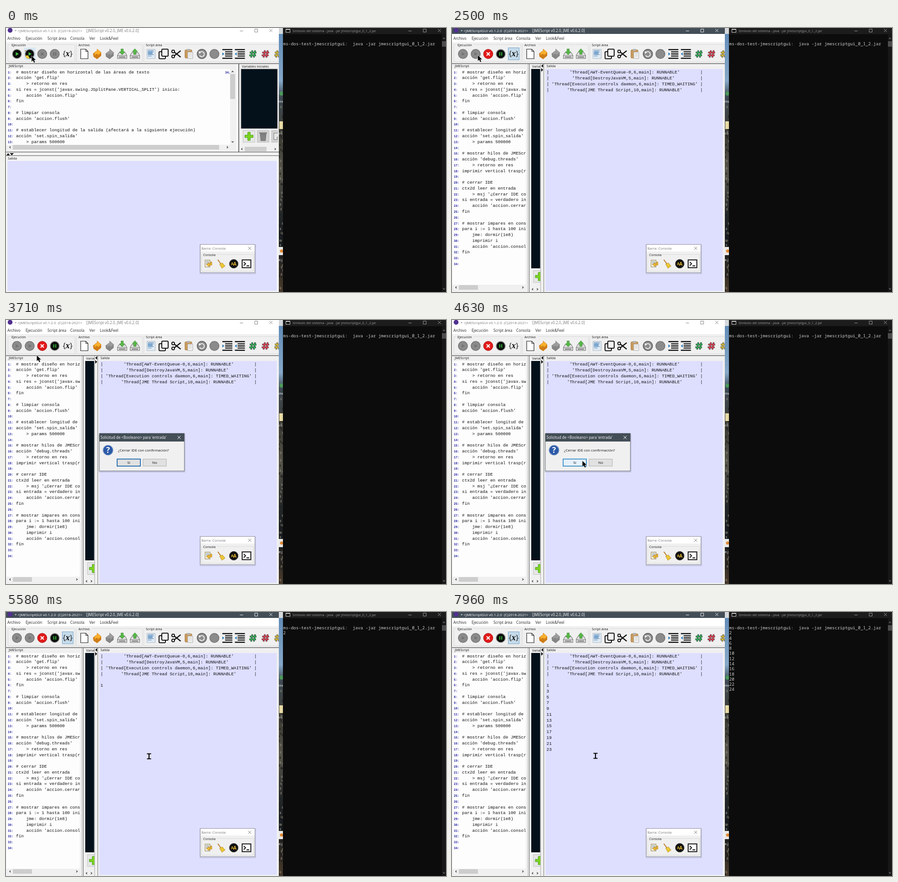
An HTML page that plays this animation: 966 px wide and 580 px high, repeating every 8000 ms.

```html
<!DOCTYPE html>
<html lang="es">
<head>
<meta charset="utf-8">
<title>JMEScriptGUI</title>
<style>
html, body { margin: 0; width: 100%; height: 100%; overflow: hidden; background: #f0f0f0; }
svg { display: block; }
text { white-space: pre; font-family: "Open Sans", "Noto Sans", sans-serif; }
.code { font-family: "Liberation Mono", "Courier New", monospace; }
.term { font-family: "Noto Sans Mono", "DejaVu Sans Mono", monospace; }
</style>
</head>
<body>
<svg id="stage" width="100%" height="100%" viewBox="0 0 966 580"></svg>
<script>
const LOOP = 8000, LINE = 12.77;
const PRESS = 1420, RUN = 1500, FLIP = 1540, OUTPUT = 1700;
const ASK = 2600, ANSWER = 5300, COUNT = 5450, STEP = 108;

const rect = (x, y, w, h, fill, more = '') => `<rect x="${x}" y="${y}" width="${w}" height="${h}" fill="${fill}" ${more}/>`;
const circle = (x, y, r, fill, more = '') => `<circle cx="${x}" cy="${y}" r="${r}" fill="${fill}" ${more}/>`;
const path = (d, fill, stroke = 'none', w = 1, more = '') => `<path d="${d}" fill="${fill}" stroke="${stroke}" stroke-width="${w}" ${more}/>`;
const line = (d, stroke, w = 1) => path(d, 'none', stroke, w);
const esc = s => s.replace(/&/g, '&amp;').replace(/</g, '&lt;');
const text = (x, y, s, size = 8.3, fill = '#222', more = '') => `<text x="${x}" y="${y}" font-size="${size}" fill="${fill}" ${more}>${esc(s)}</text>`;
const label = (x, y, s) => text(x, y, s, 7.2, '#111');
const code = (x, y, s, more = '') => text(x, y, s, 9.4, '#111', 'class="code" ' + more);
const term = (y, s, more = '') => text(608.5, y, s, 9.43, '#ccc', 'class="term" ' + more);
const at = (x, y, body) => `<g transform="translate(${x} ${y})">${body}</g>`;
const group = (id, body) => `<g id="${id}">${body}</g>`;
const clip = (x, y, w, h, body) => `<svg x="${x}" y="${y}" width="${w}" height="${h}" viewBox="${x} ${y} ${w} ${h}">${body}</svg>`;
const chevron = (x, y, turn, color = '#333') =>
  `<g transform="translate(${x} ${y}) rotate(${turn})">${line('M-2 1.2L0 -1.2L2 1.2', color, 1.2)}</g>`;
const cross = (x, y, r, color, w = 1) => line(`M${x - r} ${y - r}l${2 * r} ${2 * r}m0 ${-2 * r}l${-2 * r} ${2 * r}`, color, w);
const windowButtons = (x, color) =>
  line(`M${x - 3.5} 6.5h7M${x + 29} 2.5h6.5v6.5h-6.5z`, color, .9) + cross(x + 64.5, 5.5, 3.3, color, .9);

const script = [
  '# mostrar diseño en horizontal de las áreas de texto',
  "acción 'get.flip'",
  '    > retorno en res',
  "si res = jconst('javax.swing.JSplitPane.VERTICAL_SPLIT') inicio:",
  "    acción 'accion.flip'",
  'fin', '',
  '# limpiar consola',
  "acción 'accion.flush'", '',
  '# establecer longitud de la salida (afectará a la siguiente ejecución)',
  "acción 'set.spin_salida'",
  '    > params 500000', '',
  '# mostrar hilos de JMEScript',
  "acción 'debug.threads'",
  '    > retorno en res',
  'imprimir vertical trasp(res)', '',
  '# cerrar IDE',
  'ctx2d leer en entrada',
  "    > msj '¿Cerrar IDE con confirmación?'",
  'si entrada = verdadero inicio:',
  "    acción 'accion.cerrar'",
  'fin', '',
  '# mostrar impares en consola',
  'para i := 1 hasta 100 inicio:',
  '    jme: dormir(1e8)',
  '    imprimir i',
  "    acción 'accion.consola'",
  'fin', '', ''
];
const threads = ['AWT-EventQueue-0,6,main]: RUNNABLE', 'DestroyJavaVM,5,main]: RUNNABLE',
  'Execution controls daemon,6,main]: TIMED_WAITING', 'JME Thread Script,10,main]: RUNNABLE'];

const lineNumber = (x, y, s) => text(x, y, s, 6.7, '#2020a0', 'class="code" font-weight="bold"');
const listing = script.map((s, i) => {
  const y = 99.5 + i * LINE;
  return lineNumber(4, y, i + 1 + ':') + code(22, y, s);
}).join('');

function threadRow(s, i) {
  const full = `'Thread[${s}'`, pad = Math.floor((57 - full.length) / 2);
  return code(207.5, 100.2 + i * LINE, '| ' + (' '.repeat(pad) + full).padEnd(57) + ' |');
}

// Toolbar icons, centred on the origin
const disc = (on, mark) => circle(0, 0, 10, on ? '#0b0f0c' : '#8b8b8b', `stroke="${on ? '#9a9a9a' : '#777'}" stroke-width="1.5"`) + mark;
const triangle = fill => path('M-2.5 -4L4 0L-2.5 4Z', fill);
const pause = fill => rect(-3.2, -3.7, 2.1, 7.4, fill) + rect(1.1, -3.7, 2.1, 7.4, fill);
const broom = path('M-7 -9L1 2', 'none', '#b97a2a', 2) + path('M-3 1L3 -2L9 5L2 10Z', '#f4cf3c', '#a8801c', .8) + line('M0 2L4 8M2 0L7 6', '#c99b22', .7);
const sheet = path('M-8 -10.5H3L8 -5.5V10.5H-8Z', '#fff', '#222', 1.2) + line('M3 -10.5V-5.5H8', '#222');
const openArrow = (light, dark) => path('M-9 -1L-4 -4L9 -4V4L0 11.5L-8 6Z', dark) +
  path('M-6 5V-1Q-5 -6 0 -6V-11L9 -3L1 4V0Q-4 0 -6 5Z', light, dark, .8);
const drive = path('M-7 -3H7L10.3 3V10H-10.3V3Z', '#dedede', '#666') + line('M-10 3.5H10', '#777') + rect(-7, 6, 14, 1.6, '#555');
const downArrow = path('M-2.5 -11H2.5V-5H6L0 2L-6 -5H-2.5Z', '#58b947', '#2c7d24', .7);
const upArrow = path('M-2.5 1H2.5V-5H6L0 -11.5L-6 -5H-2.5Z', '#58b947', '#2c7d24', .7);
const selectIcon = rect(-9, -10, 18, 20, '#dfeaf4', 'stroke="#a6b8c8"') + rect(-7, -6, 10, 8, '#8fbbe2') +
  line('M-7 -7.5H6M-7 -4.5H6M-7 -1.5H4M-7 1.5H6M-7 4.5H1', '#5681aa');
const page = (x, y) => rect(x, y, 14, 15.5, '#f4f4f4', 'rx="2" stroke="#111" stroke-width="2"');
const copyIcon = page(-10, -5) + page(-4, -10.5);
const scissors = line('M-4 -4L10 7M-4 4L10 -7', '#151515', 2.4) +
  circle(-6.5, -5.5, 3, 'none', 'stroke="#151515" stroke-width="2"') + circle(-6.5, 5.5, 3, 'none', 'stroke="#151515" stroke-width="2"');
const paste = rect(-9, -9, 15, 18, '#c99a5b', 'rx="1.5" stroke="#a07438"') + rect(-5, -11, 7, 4, '#b5b5b5') +
  path('M-3 -4H8V10H-3Z', '#f2f2f2', '#aaa') + line('M-1 -1H6M-1 2H6M-1 5H6', '#bbb', .8);
const turn = circle(0, 0, 10.3, '#8d8d8d', 'stroke="#5c5c5c" stroke-width="1.4"') +
  line('M-4.5 -3A5.5 5.5 0 1 1 -5 3', '#f2f2f2', 1.8) + path('M-7 -6L-1.5 -4L-6 0Z', '#f2f2f2');
const indent = side => line('M-11 -9.5H11M-11 9.5H11M-5 -4.7H11M-5 0H11M-5 4.7H11', '#111', 2.3) +
  path(side ? 'M-11 -3.5L-7 0L-11 3.5Z' : 'M-7 -3.5L-11 0L-7 3.5Z', '#2779b8');
const bars = 'M-1 -8L-4 8M5 -8L2 8M-7 -3H8M-8 3H7';
const hash = fill => line(bars, '#223', 3.4) + line(bars, fill, 1.9);
const braces = text(-11, 4.5, '{', 17, '#222') + text(4.6, 4.5, '}', 17, '#222') +
  text(-5, 4.5, 'x', 16, '#111', 'style="font:italic bold 16px \'Noto Serif\',serif"');
const plus = path('M-2.7 -9H2.7V-2.7H9V2.7H2.7V9H-2.7V2.7H-9V-2.7H-2.7Z', '#7dd321', '#3f9a12');
const box = (x, y, fill, body) => rect(x - 13, y - 13, 26, 26, fill, 'stroke="#b5b5b5" stroke-width=".8"') + at(x, y, body);
const trash = path('M-7 -6H7L5.5 10H-5.5Z', '#777') + rect(-8.5, -8.5, 17, 2.3, '#777') + line('M-3 -4V8M0 -4V8M3 -4V8', '#999');
const highlight = (id, x) => group(id, rect(x - 12, 43.5, 24, 26.5, '#c6dbea', 'stroke="#6fa3c9"'));
const border = (x, w) => rect(x, 36.5, w, 38, 'none', 'stroke="#d9d9d9"');
const mask = (x, w) => rect(x, 33, w, 7, '#f0f0f0');

// Seeded specks stand for the landscape behind the windows
let seed = 7;
const random = () => (seed = seed * 16807 % 2147483647) / 2147483647;
const specks = Array.from({ length: 60 }, () =>
  rect(598 + random() * 9, 170 + random() * 405, 3, 5, random() < .6 ? '#1b1d1e' : '#8a8577', 'opacity=".6"')).join('');
const desktop = `<linearGradient id="view" x2="0" y2="1">
  <stop offset="0" stop-color="#5d88b5"/><stop offset=".2" stop-color="#86a8c8"/><stop offset=".26" stop-color="#3f4a54"/>
  <stop offset=".4" stop-color="#3b3a33"/><stop offset=".55" stop-color="#58564c"/><stop offset=".7" stop-color="#26292a"/>
  <stop offset=".82" stop-color="#14191d"/><stop offset="1" stop-color="#4a3b2c"/></linearGradient>` +
  clip(599, 0, 9, 580, rect(599, 0, 9, 580, 'url(#view)') + specks + rect(599, 0, 9, 13, '#d5d9dc') +
    circle(605, 144, 4.5, '#4a9a58') + rect(600, 205, 8, 17, '#e6d9a4') +
    rect(599, 481, 9, 18, '#e9e9e9') + circle(605, 490, 3.5, '#e08a35') +
    text(599, 164, 'me', 7.3, '#fff') + text(599, 234, 'co', 7.3, '#fff') + text(599, 512, 'e.j', 7.3, '#fff'));

const terminal = rect(608, 0, 358, 580, '#0c0c0c') + rect(608, 0, 358, 13.5, '#1c1c1c') +
  rect(614, 2, 10, 8, '#d0d0d0') + rect(615, 4, 8, 5, '#111') +
  text(629, 9, 'Símbolo del sistema - java  -jar jmescriptgui_0_1_2.jar', 7.45, '#999') + windowButtons(887, '#aaa') +
  rect(957, 14, 9, 566, '#171717') + rect(957, 29, 9, 12, '#4d4d4d') +
  chevron(961.5, 23, 0, '#777') + chevron(961.5, 573, 180, '#777') +
  term(37.8, 'ms-dos-test-jmescriptgui:  java -jar jmescriptgui_0_1_2.jar');

const titleText = fill => text(19, 8.6, '* <JMEScriptGUI v0.1.2.0  (C)2018-2021>', 8, fill) +
  text(176, 8.6, '[JMEScript v0.2.0, JME v0.6.2.0]', 8.14, fill) + windowButtons(517, fill);
const header = group('idle', rect(0, 0, 599, 13, '#fff') + titleText('#777')) +
  group('active', rect(0, 0, 599, 13, '#434e57') + titleText('#fff')) +
  circle(9, 5, 5.3, '#50308f') + rect(0, 13, 599, 18, '#fff') +
  [[3, 'Archivo'], [43, 'Ejecución'], [91, 'Script área'], [141, 'Consola'], [183, 'Ver'], [206, 'Look&Feel']]
    .map(([x, s]) => text(x, 26, s)).join('');

const toolbar = rect(0, 31, 599, 48, '#f0f0f0') + border(4.5, 147) + border(154.5, 145) + border(302.5, 300) +
  mask(10, 37) + mask(157, 31) + mask(305, 42) +
  label(12, 39.5, 'Ejecución') + label(159, 39.5, 'Archivo') + label(307, 39.5, 'Script área') +
  group('hover', rect(40, 43, 25, 27, '#d7e8f5')) + highlight('pressed', 52) + highlight('focus', 135.5) +
  group('ready', at(24, 57, disc(true, triangle('#45c544'))) +
    at(52, 57, at(-3, 1, broom) + disc(true, triangle('#45c544')) + path('M-10 4L-4 3L0 9L-6 10Z', '#f4cf3c', '#a8801c', .6)) +
    at(79.5, 57, disc(false, cross(0, 0, 3, '#6a6a6a', 1.6))) + at(107, 57, disc(false, pause('#6a6a6a')))) +
  group('running', at(24, 57, disc(false, triangle('#747474'))) + at(52, 57, disc(false, triangle('#747474'))) +
    at(79.5, 57, circle(0, 0, 10.3, '#e21b1b', 'stroke="#a81414"') + cross(0, 0, 3.5, '#fff', 2.2)) +
    at(107, 57, disc(true, pause('#2fb535')))) +
  [[135.5, braces], [172, sheet], [200, openArrow('#fbb22c', '#cf7d16')], [227.5, openArrow('#9d9d9d', '#858585')],
    [255, drive + downArrow], [283, drive + upArrow], [318.5, selectIcon], [346, copyIcon], [373.5, scissors], [402, paste],
    [430, turn], [457.5, disc(false, '')], [486, indent(true)], [513.5, indent(false)],
    [542, hash('#35b054')], [569.5, hash('#e0454f')], [597, hash('#e0c63a')]].map(([x, icon]) => at(x, 57, icon)).join('');
const topEdge = line('M0 77.5H599', '#bbb') + line('M0 78.5H599', '#555');

const outPanel = (x, y, w, h) => rect(x, y, w, h, '#dedfff');
const hScroll = (x1, x2, y, from, to) => rect(x1 - 5, y - 5.5, x2 - x1 + 10, 11, '#f0f0f0') + rect(from, y - 5, to - from, 10, '#cdcdcd') +
  chevron(x1, y, -90) + chevron(x2, y, 90);

const stacked = rect(0, 78, 599, 502, '#f0f0f0') + label(6, 86, 'JMEScript') +
  rect(1, 90, 491, 167, '#fdfdfd') + clip(0, 90, 492, 165, listing) + lineNumber(481, 99.5, '34,') +
  rect(492, 90, 11, 167, '#f0f0f0') + rect(492, 101, 11, 55, '#cdcdcd') + chevron(497.5, 96, 0) + chevron(497.5, 250, 180) +
  hScroll(9, 486, 262, 15, 468) + rect(506, 79, 4, 193, '#fff') + line('M511 78V272', '#444', 1.5) +
  label(518, 86.5, 'Variables iniciales') + rect(516, 90, 80, 131, '#04111a', 'stroke="#999" stroke-width=".8"') +
  clip(512, 222, 85, 32, box(533.5, 238, '#e6e6e6', plus) + box(564.5, 238, '#d2d2d2', trash) +
    box(596, 238, '#d2d2d2', rect(-8, -7, 14, 14, '#e6e6e6', 'stroke="#777"') + circle(2, 4, 4, '#aaa'))) +
  hScroll(518, 591, 266, 524, 572) + line('M0 272.5H599', '#444') +
  path('M1 279.5L4.7 275L8.4 279.5ZM8.4 275H17L12.7 279.5Z', '#000') +
  rect(0, 281, 599, 299, '#f4f4f4') + line('M0 280.5H599', '#555') + label(4, 288.5, 'Salida') + outPanel(3, 292, 591.5, 285.5);

const sideBySide = rect(0, 78, 599, 502, '#f0f0f0') + label(6, 86, 'JMEScript') +
  rect(1, 90, 161, 474, '#fdfdfd') + clip(0, 90, 162, 474, listing) + hScroll(9, 155.5, 570, 15, 57) +
  line('M166.5 79V580', '#bbb') + line('M169.5 580V78.5', '#555') +
  clip(170, 79, 24, 501, label(176, 86.5, 'Variables iniciales') + rect(174, 90, 19.5, 438, '#04111a') + box(192, 546, '#e6e6e6', plus) +
    chevron(177, 574, -90) + chevron(187.5, 574, 90)) +
  line('M194.5 79V580', '#aaa') + path('M200 79.5V87L196 83.2ZM196 88V96L200 92Z', '#000') +
  line('M201.5 580V78.5', '#777') + label(207.5, 86, 'Salida') + outPanel(205, 90, 389.5, 487.5);

const consoleBar = rect(425, 475, 124, 66, '#00000018', 'rx="2"') + rect(426.5, 475.5, 120, 62, '#f0f0f0', 'stroke="#8d8f9a"') +
  rect(427, 476, 119, 15, '#fff') + text(429, 487, 'Barra: Consola', 7.8, '#777') + cross(535, 484, 3.5, '#777', .9) +
  rect(429.5, 497.5, 114, 37, 'none', 'stroke="#d9d9d9"') + rect(431, 494, 31, 8, '#f0f0f0') + label(433, 501, 'Consola') +
  at(444, 518, rect(-7, -8, 11, 15, '#f7f2df', 'stroke="#8b7a4d"') + line('M-5 -5H2M-5 -2H2M-5 1H0', '#577fb0') +
    path('M8 -4V3H2V6L-4 1.5L2 -3V0H5V-4Z', '#f3b82d', '#9b7016', .7)) +
  at(472, 518, broom) +
  at(500, 518, circle(0, 0, 9.7, '#111', 'stroke="#555"') + text(-6, 3, 'A', 8, '#e6b930', 'font-weight="bold"') + text(-1, 3.5, 'A', 10, '#e6b930', 'font-weight="bold"')) +
  at(528, 518, rect(-9.5, -8.5, 19, 17, '#fff', 'stroke="#111" stroke-width="2"') + line('M-6 -4L-2 0L-6 4M0 4.5H6', '#111', 1.8));

const button = (id, x, s) => rect(x, 305.5, 51, 15.5, '#e1e1e1', `id="${id}" stroke="#adadad"`) +
  text(x + 25.5, 316.2, s, 8, '#111', 'text-anchor="middle"');
const dialog = group('dialog', rect(203, 249, 191, 86, '#00000022', 'rx="3"') +
  rect(205, 249, 186.5, 82.5, '#f0f0f0', 'stroke="#5c656c" stroke-width=".8"') + rect(205, 249, 186.5, 18, '#434e57') +
  text(207.5, 261, "Solicitud de <Booleano> para 'entrada'", 8.1, '#fff') + cross(380, 258, 3.4, '#fff', 1) +
  circle(224, 286, 11, '#2c5aa8', 'stroke="#9ab0d0" stroke-width="1.2"') + text(224, 292, '?', 17, '#fff', 'text-anchor="middle" font-weight="bold"') +
  text(246, 289.2, '¿Cerrar IDE con confirmación?', 8, '#111') + button('yes', 244, 'Sí') + button('no', 301, 'No'));

const odd = i => code(207.5, 100.2 + (5 + (i - 1) / 2) * LINE, String(i), 'data-i="' + i + '"');
const even = i => term(49.3 + (i / 2 - 1) * 11.29, String(i), 'data-i="' + i + '"');
const counters = Array.from({ length: 24 }, (_, k) => k % 2 ? even(k + 1) : odd(k + 1)).join('');

const stage = document.getElementById('stage');
stage.innerHTML = clip(0, 0, 599, 580, header + toolbar + group('stacked', stacked) +
    group('split', sideBySide) + topEdge + group('threads', threads.map(threadRow).join(''))) +
  desktop + terminal + group('counters', counters) + consoleBar + dialog +
  group('arrow', path('M0 0V13.2L3.1 10.5L5.4 15.4L8 14.3L5.8 9.6H10Z', '#000', '#fff', .5)) +
  group('beam', line('M-4.5 -5.5H4.5M-4.5 5.5H4.5M0 -5.5V5.5', '#000', 2.2));

const el = id => document.getElementById(id);
const show = (id, on) => el(id).setAttribute('display', on ? 'inline' : 'none');
const clamp = v => Math.max(0, Math.min(1, v));
const ease = p => 1 - (1 - p) ** 3;

// time, x, y of the pointer
const track = [[0, 56, 61], [130, 56, 61], [630, 56, 60], [830, 57, 60], [880, 57, 61], [1210, 57, 60], [2420, 56.5, 59.5],
  [3650, 57, 61], [3710, 67, 77], [4040, 200, 215], [4300, 262, 288], [4630, 286, 309], [4880, 314, 317],
  [6500, 314, 317], [6540, 315, 316], [8000, 315, 316]];

function pointer(t) {
  const k = track.findIndex((p, i) => i && t <= p[0]);
  const [t0, x0, y0] = track[k - 1], [t1, x1, y1] = track[k], p = (t - t0) / (t1 - t0);
  return [x0 + (x1 - x0) * p, y0 + (y1 - y0) * p];
}

function paintButton(id, hover, chosen) {
  const b = el(id);
  b.setAttribute('fill', hover ? '#e5f1fb' : '#e1e1e1');
  b.setAttribute('stroke', hover ? '#4795cc' : chosen ? '#2f73b3' : '#adadad');
  b.setAttribute('stroke-width', chosen ? 2 : 1);
}

function draw(t) {
  const asking = t >= ASK && t < ANSWER, active = t >= PRESS && !asking, flipped = t >= FLIP;
  show('active', active);
  show('idle', !active);
  show('hover', t < PRESS);
  show('pressed', t >= PRESS && t < RUN);
  show('focus', active && t >= RUN);
  show('ready', t < RUN);
  show('running', t >= RUN);
  show('stacked', !flipped);
  show('split', flipped);
  show('threads', t >= OUTPUT);

  const shown = t < ANSWER ? ease(clamp((t - ASK) / 200)) : 1 - clamp((t - ANSWER) / 120);
  const size = .92 + .08 * shown;
  show('dialog', shown > 0);
  el('dialog').setAttribute('opacity', shown);
  el('dialog').setAttribute('transform', `translate(298 290) scale(${size}) translate(-298 -290)`);

  const [x, y] = pointer(t), inRow = y > 305 && y < 321;
  paintButton('yes', inRow && x > 244 && x < 295, true);
  paintButton('no', inRow && x > 301 && x < 352, false);
  show('arrow', t < ANSWER);
  show('beam', t >= ANSWER);
  for (const id of ['arrow', 'beam']) el(id).setAttribute('transform', `translate(${x} ${y})`);

  for (const n of el('counters').children)
    n.setAttribute('display', t >= COUNT + STEP * (n.dataset.i - 1) ? 'inline' : 'none');
}

const start = performance.now();
function tick() {
  draw((performance.now() - start) % LOOP);
  requestAnimationFrame(tick);
}
tick();
</script>
</body>
</html>
```
